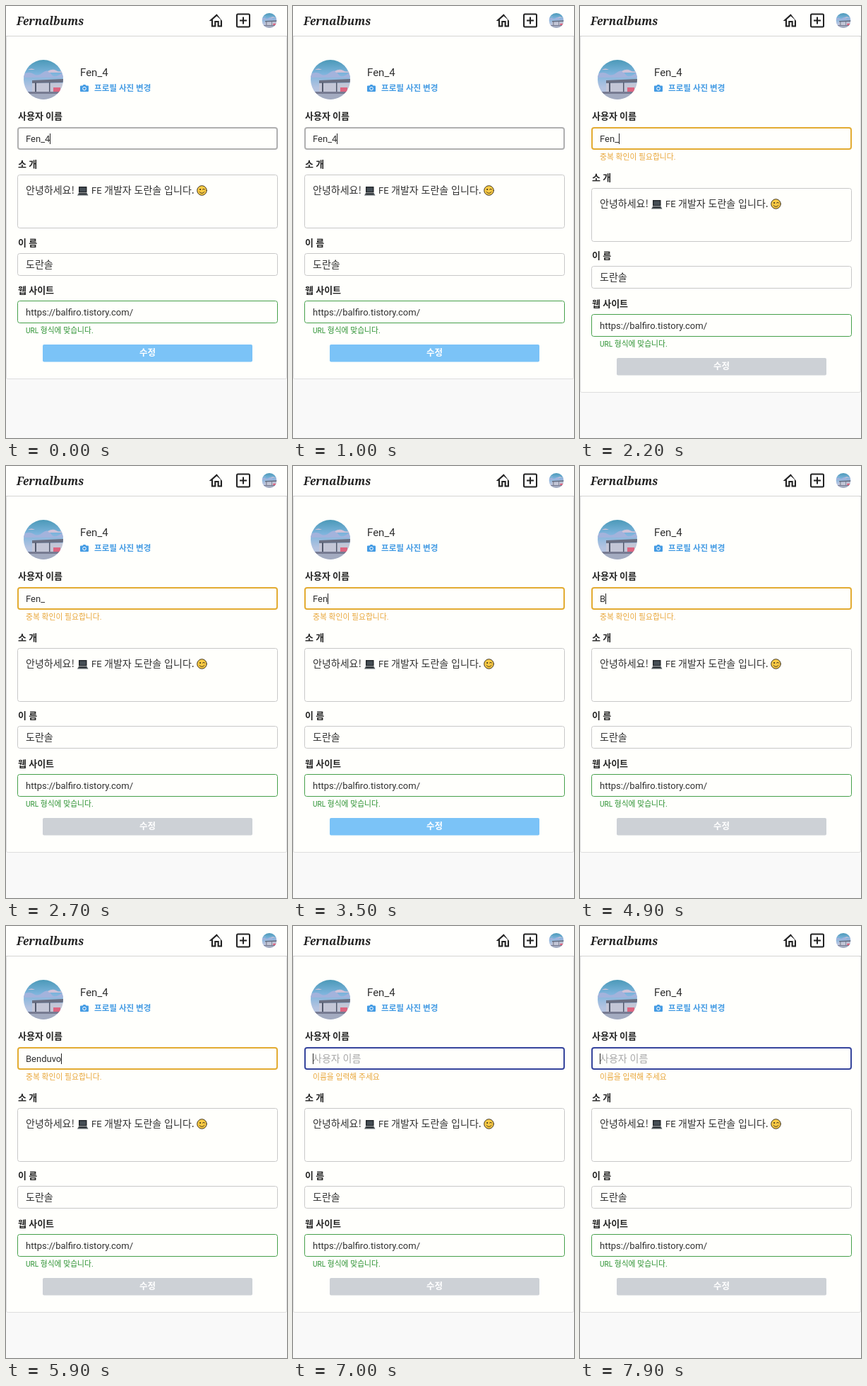
An HTML page that plays this animation: 398 px wide and 610 px high, repeating every 8000 ms.

```html
<!DOCTYPE html>
<html lang="ko">
<head>
<meta charset="utf-8">
<style>
  html, body { margin: 0; width: 100%; height: 100%; overflow: hidden; background: #f9f9f9; }
  svg { display: block; }
  text { font-family: Roboto, "Noto Sans CJK KR", "Noto Sans CJK", sans-serif; fill: #303030; white-space: pre; }
  .latin { font-size: 13px; }
  .hangul { font-size: 14px; font-family: "Noto Sans CJK KR", "Noto Sans CJK", sans-serif; font-weight: 300; }
  .label { font-size: 13px; font-weight: 700; fill: #262626; }
  .help { font-size: 10.8px; }
  .brand { font: italic 700 15.5px "Noto Serif", serif; fill: #222; }
  .box { fill: none; stroke: #c8c8c8; }
</style>
</head>
<body>
<svg width="398" height="610" viewBox="0 0 398 610">
  <defs>
    <linearGradient id="sky" x2="0" y2="1">
      <stop offset="0" stop-color="#4b99b8"/>
      <stop offset=".35" stop-color="#7db4dc"/>
      <stop offset=".7" stop-color="#b4c3e0"/>
    </linearGradient>
    <clipPath id="round"><circle r="28"/></clipPath>
    <g id="avatar" clip-path="url(#round)">
      <rect x="-28" y="-28" width="56" height="56" fill="url(#sky)"/>
      <path d="M-28-8q8-4 14 0t13-2 12 2 17-3v8h-56z" fill="#a3b3dc"/>
      <path d="M6-12q7-4 12-1t10 0v3H8zM-22-14q5-3 10 0z" fill="#d0c2d8"/>
      <path d="M-16 5h44v13h-44z" fill="#c3c6d6"/>
      <path d="M-16 1L28-1v5l-44 1z" fill="#6a6f82"/>
      <path d="M-12 4h2v15h-2zM8 4h1.500v15H8z" fill="#525a6e"/>
      <path d="M14 11h10v8H14z" fill="#dc6580"/>
      <path d="M-28 17h56v3h-56z" fill="#777b92"/>
      <path d="M-28 20h56v8h-56z" fill="#a3abc0"/>
    </g>
  </defs>

  <rect width="398" height="610" fill="#f9f9f9"/>
  <rect id="card" x=".5" y="42.5" width="397" rx="2" fill="#fffffc" stroke="#dedede"/>
  <rect width="398" height="42" fill="#fffffd"/>
  <path d="M0 42.5h398" stroke="#d4d4d4"/>

  <text class="brand" x="15" y="27">Fernalbums</text>
  <path transform="translate(285.5 8) scale(1.08)" fill="#222"
    d="M12 5.69l5 4.5V18h-2v-6H9v6H7v-7.81l5-4.5M12 3L2 12h3v8h6v-6h2v6h6v-8z"/>
  <g fill="none" stroke="#222" stroke-width="2">
    <rect x="327" y="11.5" width="18" height="18" rx="1.5"/>
    <path d="M331 20.5h10M336 15.5v10"/>
  </g>
  <use href="#avatar" transform="translate(373 20.5) scale(.375)"/>
  <use href="#avatar" transform="translate(53 104)"/>

  <text x="105" y="99" font-size="15">Fen_4</text>
  <g fill="#459ce4">
    <path d="M106 112.5h2.5l1.2-1.5h2.6l1.2 1.5h2.5q1 0 1 1v6.500q0 1-1 1h-10q-1 0-1-1v-6.500q0-1 1-1z"/>
    <circle cx="111" cy="116.700" r="2.300" fill="none" stroke="#fff"/>
  </g>
  <text x="125" y="120" font-size="11.6" font-weight="700" style="fill:#459ce4">프로필 사진 변경</text>

  <text class="label" x="17" y="160">사용자 이름</text>
  <rect id="userBox" x="17" y="172" width="367" height="30" rx="3" fill="none" stroke-width="2"/>
  <text id="hint" class="hangul" x="28" y="192" style="fill:#a8a8a8">사용자 이름</text>
  <text id="user" class="latin" x="28" y="192"></text>
  <path id="caret" d="M.5 180v15" stroke="#222"/>
  <text id="help" class="help" x="28" y="217" style="fill:#e8a63a"></text>

  <g data-y="238.4">
    <text class="label" x="17" y="-10.500">소 개</text>
    <rect class="box" x="16.500" y=".5" width="368" height="75" rx="3"/>
    <text class="hangul" x="28" y="27">안녕하세요!</text>
    <g transform="translate(101 16)">
      <path d="M2 1h11.500v8.500H2z" fill="#24282c"/>
      <path d="M3.500 2.500h8.500v5.500H3.500z" fill="#454e55"/>
      <path d="M2 10h11.500l2 3.500H0z" fill="#555c60"/>
      <path d="M2.500 11.500h10.500" stroke="#22272a"/>
    </g>
    <text class="latin" x="121" y="27">FE</text>
    <text class="hangul" x="139" y="27">개발자 도란솔 입니다.</text>
    <g transform="translate(277.500 22.500)" fill="none" stroke="#41351d" stroke-linecap="round">
      <circle r="6.800" fill="#fbcb45"/>
      <path d="M1-1.500q1.500-1.500 3 0M-3.500 2q3.500 4 7 0"/>
      <circle cx="-2.500" cy="-1.500" r=".6" fill="#41351d"/>
    </g>
  </g>
  <g data-y="348.7">
    <text class="label" x="17" y="-10.500">이 름</text>
    <rect class="box" x="16.500" y=".5" width="368" height="31" rx="3"/>
    <text class="hangul" x="28" y="21">도란솔</text>
  </g>
  <g data-y="416.4">
    <text class="label" x="17" y="-10.500">웹 사이트</text>
    <rect class="box" x="16.500" y=".5" width="368" height="31" rx="3" style="stroke:#46a04a"/>
    <text class="latin" x="28" y="20.500">https://balfiro.tistory.com/</text>
    <text class="help" x="28" y="45.500" style="fill:#2c9232"><tspan font-size="10">URL</tspan> 형식에 맞습니다.</text>
  </g>
  <g data-y="478.4">
    <rect id="button" x="52" width="297" height="24.500" rx="2"/>
    <text x="200.500" y="16" font-size="12.5" font-weight="700" text-anchor="middle" style="fill:#fff">수정</text>
  </g>
</svg>
<script>
  const LOOP = 8000, STEP = 100, SHIFT = 18.6, REPEAT = 33;
  const NICK = 'Benduvo';
  const $ = id => document.getElementById(id);
  const set = (id, name, value) => $(id).setAttribute(name, value);
  const blocks = document.querySelectorAll('[data-y]');

  // Each edit is [time, text]; a held backspace repeats after half a second.
  const erase = (start, text) => Array.from(text, (_, i) =>
    [start + (i ? 500 + i * REPEAT : 0), text.slice(0, text.length - 1 - i)]);
  const typing = [4750, 5000, 5300, 5450, 5550, 5700, 5800];
  const edits = [
    [0, 'Fen_4'], [1800, 'Fen_'],
    ...erase(3000, 'Fen_'),
    ...typing.map((time, i) => [time, NICK.slice(0, i + 1)]),
    ...erase(6130, NICK)
  ];
  const caretOff = [[500, 1000], [1600, 1800], [2330, 2860], [4090, 4620], [7360, 7890]];

  function draw(t) {
    const text = edits.filter(edit => edit[0] <= t).pop()[1];
    const edited = t >= 1800;
    const active = !edited || text === 'Fen';
    const shift = edited ? SHIFT : 0;

    $('user').textContent = text;
    $('hint').style.display = text ? 'none' : '';
    $('help').textContent = !edited ? '' : text ? '중복 확인이 필요합니다.' : '이름을 입력해 주세요';
    set('userBox', 'stroke', !edited ? '#b0b0b0' : text ? '#e3ac32' : '#36459c');
    set('button', 'fill', active ? '#7bc3f7' : '#cdd1d6');
    set('card', 'height', Math.round(526.4 + shift) - 42);

    const blink = caretOff.some(([from, to]) => t >= from && t < to);
    const end = text ? $('user').getComputedTextLength() : 0;
    set('caret', 'transform', `translate(${Math.floor(28 + end)} 0)`);
    set('caret', 'visibility', blink ? 'hidden' : 'visible');

    for (const block of blocks) {
      block.setAttribute('transform', `translate(0 ${Math.round(+block.dataset.y + shift)})`);
    }
  }

  const start = performance.now();
  function tick() {
    const t = (performance.now() - start) % LOOP;
    draw(Math.floor(t / STEP) * STEP);
    requestAnimationFrame(tick);
  }
  tick();
</script>
</body>
</html>
```
